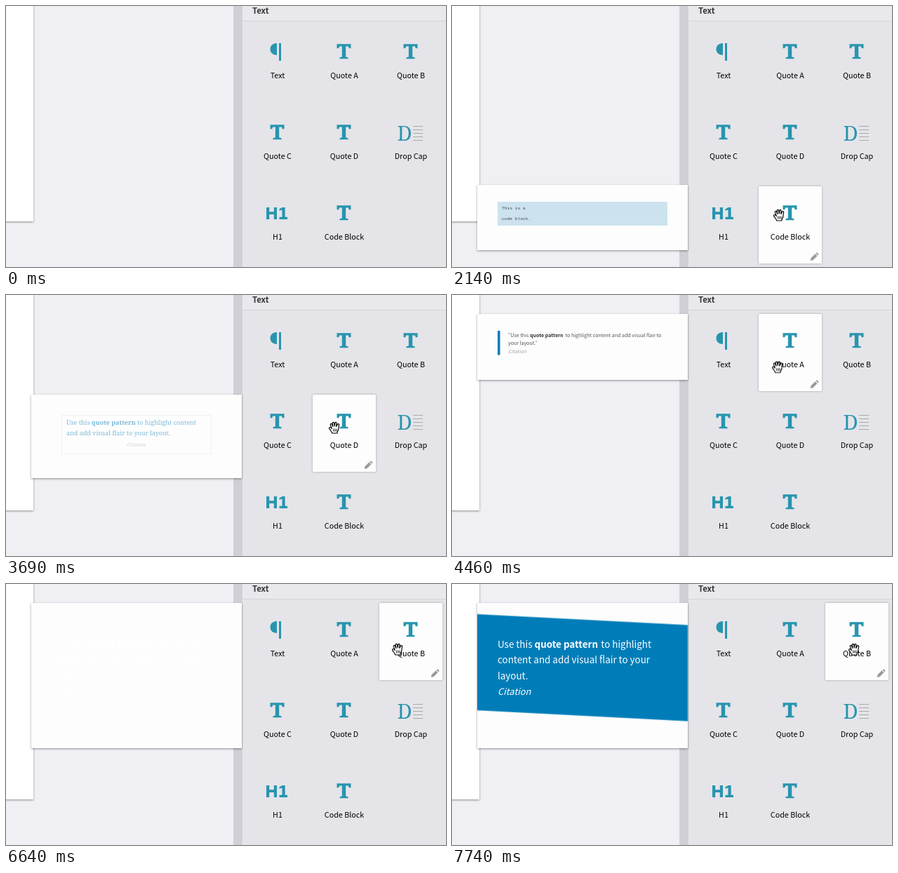
Write an HTML page that moves like this. It is 627 px wide and 372 px high and loops after 8 s.

```html
<!DOCTYPE html>
<html lang="en">
<head>
<meta charset="utf-8">
<title>Text pattern previews</title>
<style>
html, body { margin: 0; width: 100%; height: 100%; overflow: hidden; background: #f0eff4; }
svg { display: block; width: 627px; height: 372px; }
text { font-family: "Noto Sans CJK JP", "Noto Sans CJK SC", "Noto Sans CJK", "Open Sans", sans-serif; white-space: pre; }
.label { font-size: 10.73px; text-anchor: middle; fill: #000; }
.title { font-size: 11.4px; font-weight: 700; fill: #333338; }
.small { font-size: 7.05px; fill: #555; }
.large { font-size: 13.42px; fill: #fff; }
.serif { font-family: "Noto Serif", "Liberation Serif", serif; }
.mono { font-family: "Liberation Mono", monospace; font-size: 6.25px; fill: #444; }
.quote { font-size: 9px; fill: #007db8; }
.b { font-weight: 700; }
.i { font-style: italic; }
.lift { filter: drop-shadow(0 1px 1.5px rgba(0,0,0,.42)); }
.card rect { fill: #fdfdfd; filter: drop-shadow(0 0 1.5px rgba(0,0,0,.3)); }
.teal { fill: #2795ae; }
.card, .preview, #cursor { opacity: 0; }
#band { transform: scaleY(0); }
</style>
</head>
<body>
<svg viewBox="0 0 627 372">
  <defs>
    <path id="T" d="M-10-10.5H10V-4.5H7.3L6.3-7.3H2.7V7.8L6 8.6V10.5H-6V8.6L-2.7 7.8V-7.3H-6.3L-7.3-4.5H-10Z"/>
  </defs>
  <rect width="627" height="372" fill="#f0eff4"/>
  <rect class="lift" x="-10" y="-10" width="49" height="317" fill="#fff"/>
  <rect x="324" width="12" height="372" fill="#cfd0d5"/>
  <rect x="336" width="291" height="372" fill="#e5e4e9"/>
  <rect x="336" width="291" height="21" fill="#e9e8ed"/>
  <rect x="336" y="21" width="291" height="1" fill="#d2d2d7"/>
  <rect x="336" width="1" height="372" fill="#d3d3d8"/>
  <text class="title" x="351" y="11">Text</text>

  <g id="cards"></g>
  <g id="icons" class="teal">
    <path d="M386 53V70C380 70 376.5 66 376.5 61.5S380 53 386 53ZM389 53H392V78H389Z"/>
    <path d="M371 287H375.2V293.3H381.8V287H386V304H381.8V297H375.2V304H371ZM389.5 289.3L394 287H397.6V300.7H401V304H389.5V300.7H393.5V290.6L389.5 291.8Z"/>
    <text class="serif" x="557.5" y="192" font-size="29">D</text>
    <path d="M580 171.5H594M580 176.5H594M580 181.5H594M580 186.5H594M580 191.5H594" stroke="#a9a9ae"/>
  </g>
  <g id="labels"></g>

  <g class="preview" data-key="h1">
    <rect class="lift" x="36" y="255" width="300" height="93" fill="#fdfdfd"/>
    <text x="65" y="307" font-size="19" class="b" fill="#333">Heading 1</text>
  </g>
  <g class="preview" data-key="code">
    <rect class="lift" x="36" y="255" width="300" height="93" fill="#fdfdfd"/>
    <rect x="65" y="279" width="242" height="34" fill="#cce3ef"/>
    <text class="mono" x="71" y="290">This is a</text>
    <text class="mono" x="71" y="305">code block.</text>
  </g>
  <g class="preview" data-key="c">
    <rect class="lift" x="36" y="142" width="300" height="138" fill="#fdfdfd"/>
    <g id="textC" text-anchor="middle">
      <text class="serif quote" x="186" y="199">Use this <tspan class="b">quote pattern</tspan> to highlight content</text>
      <text class="serif quote" x="186" y="214">and add visual flair to your layout.</text>
      <text class="serif i" x="186" y="231" font-size="7.2" fill="#aaa">Citation</text>
    </g>
  </g>
  <g class="preview" data-key="d">
    <rect class="lift" x="36" y="142" width="300" height="119" fill="#fdfdfd"/>
    <g id="textD">
      <rect x="79.5" y="171.5" width="213" height="55" fill="none" stroke="#e6e6e6"/>
      <text class="serif quote" x="86" y="185.3">Use this <tspan class="b">quote pattern</tspan> to highlight content</text>
      <text class="serif quote" x="86" y="200.3">and add visual flair to your layout.</text>
      <text class="serif i" x="186" y="215.5" font-size="7.2" fill="#aaa" text-anchor="middle">Citation</text>
    </g>
  </g>
  <g class="preview" data-key="a">
    <rect class="lift" x="36" y="27" width="300" height="94" fill="#fdfdfd"/>
    <rect x="65" y="51" width="3.5" height="34.5" fill="#007db8"/>
    <text class="small" x="80" y="59.7">“Use this <tspan class="b" x="111" fill="#333">quote pattern</tspan><tspan x="161.5">to highlight content and add visual flair to</tspan></text>
    <text class="small" x="80" y="71.2">your layout.”</text>
    <text class="small i" x="80" y="82.7" style="fill:#a5a5a5">Citation</text>
  </g>
  <g class="preview" data-key="text">
    <rect class="lift" x="36" y="26" width="300" height="94" fill="#fdfdfd"/>
    <text class="small" x="65" y="58.7">This is a paragraph of placeholder text. It is only here to help show the</text>
    <text class="small" x="65" y="70.2">layout of the page and how the text will flow. Replace this placeholder</text>
    <text class="small" x="65" y="81.7">text with your own meaningful content.</text>
  </g>
  <g class="preview" data-key="b">
    <rect class="lift" x="36" y="27" width="300" height="207" fill="#fdfdfd"/>
    <g transform="matrix(1 .0517 0 1 36 111.5)">
      <rect id="band" y="-68.5" width="300" height="137" fill="#007db8"/>
    </g>
    <text class="large" x="65" y="91">Use this <tspan class="b" x="117.5">quote pattern</tspan><tspan x="212.3">to highlight</tspan></text>
    <text class="large" x="65" y="113.3">content and add visual flair to your</text>
    <text class="large" x="65" y="135.8">layout.</text>
    <text class="large i" x="65" y="158" style="font-size:12.9px">Citation</text>
  </g>

  <g id="cursor" fill="#fff" stroke="#000" stroke-width="1.2" stroke-linejoin="round" stroke-linecap="round">
    <path d="M-3.2 8C-3.8 5.8-6 3.6-7.2 1.6C-8.2-.2-6-1.2-4.8.2L-3.7 1.5L-5.6-3.6C-6.3-5.6-4.2-6.4-3.4-4.6L-2.1-1.5L-2.8-6C-3-8-.8-8.3-.4-6.4L.2-2L.8-6.3C1.1-8.2 3.2-7.9 3-6L2.7-1.6L4.3-4.6C5.2-6.2 7.2-5.2 6.5-3.5C5.8-1.6 6.3.8 5.6 3C5 4.8 4 5.6 3.8 8Z"/>
    <path d="M-1.3 2V5.2M.9 2V5.2M3 2V5.2" fill="none" stroke-width=".9"/>
  </g>
</svg>
<script>
const LOOP = 8000, NS = "http://www.w3.org/2000/svg";
const $ = id => document.getElementById(id);

function add(parent, tag, attrs, html = "") {
  const el = document.createElementNS(NS, tag);
  for (const k in attrs) el.setAttribute(k, attrs[k]);
  el.innerHTML = html;
  parent.append(el);
  return el;
}

// steps: [ms, value, easing towards the next step]
function play(el, prop, steps) {
  const all = [[0, steps[0][1]], ...steps, [LOOP, steps[steps.length - 1][1]]];
  el.animate(all.map(([t, v, easing = "linear"]) => ({ offset: t / LOOP, [prop]: v, easing })),
    { duration: LOOP, iterations: Infinity });
}

function fade(el, spans, d = 130) {
  const steps = [];
  for (const [from, to] of spans) {
    steps.push([from, 0], [from + d, 1]);
    if (to < LOOP) steps.push([to, 1], [to + d, 0]);
  }
  play(el, "opacity", steps);
}

// key, label, column, row, hover times
const items = [
  ["text", "Text", 0, 0, [[5250, 6190]]],
  ["a", "Quote A", 1, 0, [[4230, 5250], [6190, 6440]]],
  ["b", "Quote B", 2, 0, [[6440, LOOP]]],
  ["c", "Quote C", 0, 1, [[2380, 3130]]],
  ["d", "Quote D", 1, 1, [[3130, 4230]]],
  ["cap", "Drop Cap", 2, 1],
  ["h1", "H1", 0, 2, [[560, 1370]]],
  ["code", "Code Block", 1, 2, [[1370, 2380]]]
];

for (const [key, label, col, row, spans] of items) {
  const x = 342 + 95 * col, y = 27 + 115 * row;
  add($("labels"), "text", { class: "label", x: x + 45, y: y + 76 }, label);
  if (!["text", "cap", "h1"].includes(key))
    add($("icons"), "use", { href: "#T", x: x + 44.5, y: y + 37.7 });
  if (!spans) continue;
  const card = add($("cards"), "g", { class: "card", transform: `translate(${x} ${y})` },
    '<rect width="90" height="110" rx="1.5"/>' +
    '<path d="M73.7 106L74.5 102.2L80.6 96.3L83.5 99.2L77.4 105.2ZM81.4 95.5L82.3 94.7Q83 94.2 83.7 94.8L85 96.1Q85.6 96.8 85.1 97.4L84.3 98.4Z" fill="#9b9b9e"/>');
  fade(card, spans);
  fade(document.querySelector(`.preview[data-key="${key}"]`), spans);
}

fade($("textC"), [[2570, LOOP]], 370);
fade($("textD"), [[3500, LOOP]], 370);
play($("band"), "transform", [[6740, "scaleY(0)", "ease"], [7740, "scaleY(1)"]]);

const at = (x, y) => `translate(${x}px, ${y}px)`;
const move = "cubic-bezier(.35,.1,.3,1)";
fade($("cursor"), [[479, LOOP]], 1);
play($("cursor"), "transform", [
  [480, at(404, 368), move], [800, at(411, 304)],
  [1260, at(411, 304), move], [1560, at(466, 298)],
  [2140, at(466, 298), move], [2640, at(410, 194)],
  [3000, at(410, 194), move], [3380, at(468, 189)],
  [4110, at(468, 189), move], [4500, at(464, 102)],
  [5120, at(464, 102), move], [5440, at(414, 92)],
  [6060, at(414, 92), "ease-in-out"], [6800, at(573, 93)]
]);
</script>
</body>
</html>
```
